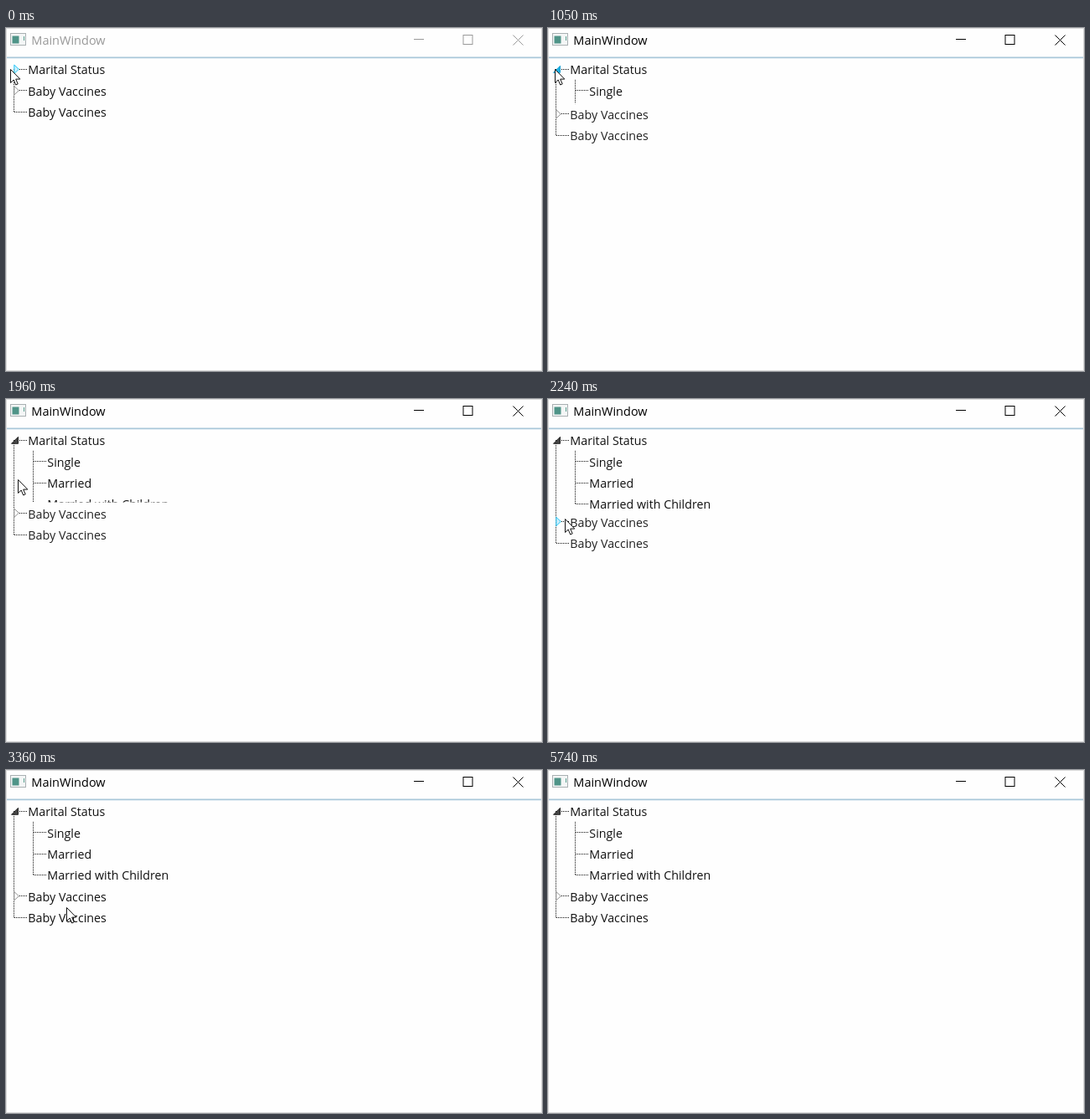
Write an HTML page that moves like this. It is 640 px wide and 410 px high and loops after 6.16 s.

```html
<!DOCTYPE html>
<html lang="en">
<head>
<meta charset="utf-8">
<title>MainWindow</title>
<style>
  html, body { margin: 0; width: 100%; height: 100%; overflow: hidden; background: #fff; }
  svg { display: block; width: 640px; height: 410px; }
  text { font: 14.3px "Open Sans", "Noto Sans", sans-serif; fill: #111; }
  .title { font-size: 14.5px; fill: currentColor; }
  .chrome { color: #999; }
  .chrome.active { color: #000; }
  .buttons { fill: none; stroke: currentColor; }
  .dots { fill: none; stroke: #111; stroke-dasharray: 1 1; shape-rendering: crispEdges; }
  .moving text { fill: #222; }
  .closed { fill: #fff; stroke: #929292; }
  .closed.hover { fill: #cceefb; stroke: #27c7f7; }
  .open { fill: #444; stroke: #262626; }
  .open.hover { fill: #1cb4e8; stroke: #1c9fd0; }
</style>
</head>
<body>
<svg viewBox="0 0 640 410">
  <rect width="640" height="410" fill="#fefefe"/>
  <g class="chrome" id="chrome">
    <rect x="5.5" y="6.5" width="18" height="14" fill="#f4f6f6" stroke="#a9b0b2"/>
    <rect x="7.5" y="9.5" width="8" height="9" fill="#4f9488"/>
    <path d="M21.5 10v5" stroke="#59a08f"/>
    <text class="title" x="30.3" y="20">MainWindow</text>
    <g class="buttons">
      <path d="M487 13.5h12"/>
      <rect x="546" y="8.5" width="11" height="11"/>
      <path d="M605.5 8.5l12 12m0-12l-12 12"/>
    </g>
  </g>
  <path d="M1 35.3h638" stroke="#a9c8da" stroke-width="1.7"/>
  <rect x=".5" y=".5" width="639" height="409" fill="none" stroke="#dcdcdc"/>

  <clipPath id="reveal"><rect id="revealBox" x="28" y="62" width="200" height="0"/></clipPath>
  <path class="dots" id="trunk"/>
  <g id="parent"></g>
  <path id="parentArrow"/>
  <g clip-path="url(#reveal)">
    <path class="dots" d="M32.5 62V126"/>
    <g id="children"></g>
  </g>
  <g id="siblings"></g>
  <path id="siblingArrow"/>
  <path id="cursor" d="M.5 .5v16l3.700-3.500l2.500 6l2.500-1.100l-2.500-5.800h5.100z" fill="#fff" stroke="#111"/>
</svg>
<script>
const LOOP = 6160, STEP = 70, ROW = 25.35, GROWTH = 76;
const CLICK = 210, OPEN_START = 280, OPEN_END = 2356, CURSOR_GONE = 5740;
const $ = id => document.getElementById(id);

// Resting and turning points of the pointer tip
const pointer = [
  { t: 0, x: 5, y: 49 }, { t: 210, x: 8, y: 49 },
  { t: 1680, x: 8, y: 49 }, { t: 2240, x: 20, y: 143 },
  { t: 2520, x: 20, y: 143 }, { t: 3080, x: 131, y: 150 },
  { t: 3360, x: 72, y: 164 }, { t: 3780, x: 30, y: 146 },
  { t: 4200, x: 15, y: 64 }, { t: 5180, x: 15, y: 64 },
  { t: 5740, x: 330, y: 430 }
];

const between = (t, from, to) => t >= from && t < to;
const clamp = v => Math.min(1, Math.max(0, v));
const ease = k => k * k * (3 - 2 * k);
const baseline = row => Math.round(55.2 + row * ROW);
const lineY = row => Math.round(49 + row * ROW) + .5;

function pointerAt(t) {
  const next = pointer.findIndex(p => p.t > t);
  const a = pointer[next - 1], b = pointer[next];
  const k = ease((t - a.t) / (b.t - a.t));
  return [a.x + (b.x - a.x) * k, a.y + (b.y - a.y) * k].map(Math.round);
}

function addRows(id, names, firstRow, lineStart, textX) {
  $(id).innerHTML = names.map((name, i) => {
    const row = firstRow + i;
    return `<path class="dots" d="M${lineStart} ${lineY(row)}H${Math.floor(textX)}"/>
      <text x="${textX}" y="${baseline(row)}">${name}</text>`;
  }).join("");
}

function drawArrow(id, y, open, hover) {
  const arrow = $(id);
  arrow.setAttribute("d", open ? `M6.5 ${y + 4}h8v-8z` : `M9.8 ${y - 5.2}l5.5 5.2l-5.5 5.2z`);
  arrow.setAttribute("class", (open ? "open" : "closed") + (hover ? " hover" : ""));
}

function render(t) {
  const progress = clamp((t - OPEN_START) / (OPEN_END - OPEN_START));
  const shift = progress * GROWTH;
  const overSibling = between(t, 2170, 2660) || between(t, 3570, 3710);

  $("chrome").classList.toggle("active", t >= CLICK);
  drawArrow("parentArrow", 49.3, t >= OPEN_START, t < 1820);
  drawArrow("siblingArrow", 74.7 + shift, false, overSibling);

  $("trunk").setAttribute("d", `M9.5 49V${Math.round(101 + shift)}`);
  $("siblings").setAttribute("transform", `translate(0 ${shift})`);
  $("siblings").classList.toggle("moving", between(progress, .001, 1));
  $("revealBox").setAttribute("height", shift);

  const visible = t < CURSOR_GONE;
  $("cursor").setAttribute("visibility", visible ? "visible" : "hidden");
  if (visible) $("cursor").setAttribute("transform", `translate(${pointerAt(t)})`);
}

addRows("parent", ["Marital Status"], 0, 16, 26.3);
addRows("children", ["Single", "Married", "Married with Children"], 1, 33, 49.3);
addRows("siblings", ["Baby Vaccines", "Baby Vaccines"], 1, 10, 26.3);

const start = performance.now();
function tick() {
  const t = (performance.now() - start) % LOOP;
  render(Math.floor(t / STEP) * STEP);
  requestAnimationFrame(tick);
}
render(0);
requestAnimationFrame(tick);
</script>
</body>
</html>
```
